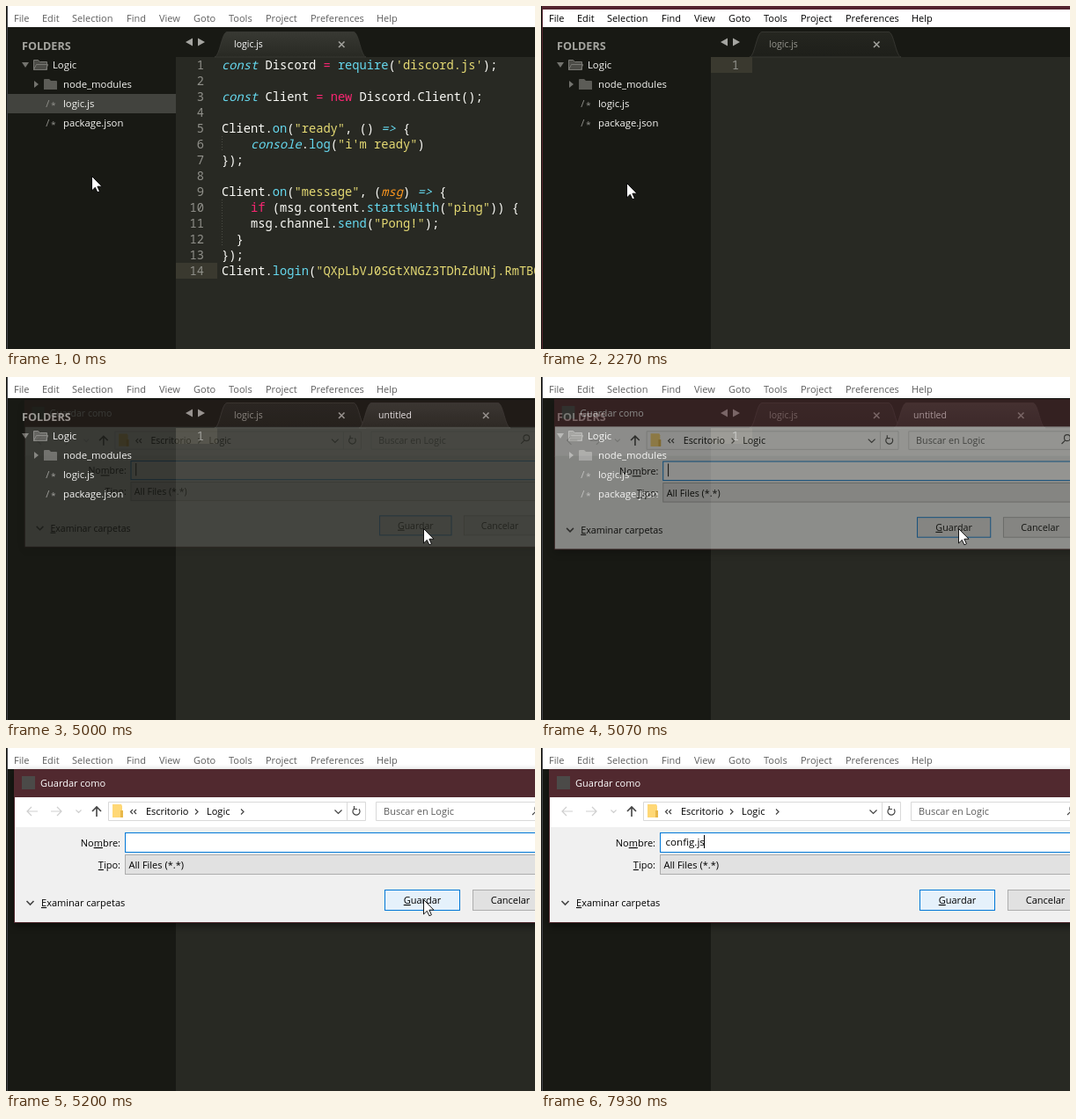
An HTML page that plays this animation: 601x390 px, repeating every 8 s.

```html
<!DOCTYPE html>
<html lang="en">
<head>
<meta charset="utf-8">
<title>Editor: save as</title>
<style>
  html, body { margin: 0; width: 100%; height: 100%; overflow: hidden; background: #181914; }
  svg { display: block; }
  text { white-space: pre; font: 11px "Open Sans", "Noto Sans", sans-serif; }
  .code text { font: 500 13.745px "Noto Sans Mono", "DejaVu Sans Mono", monospace; fill: #fcfcf8; }
  .code .num { fill: #90908a; text-anchor: end; }
  .kw { fill: #f92672; }
  .fn { fill: #66d9ef; }
  .type { fill: #66d9ef; font-style: italic; }
  .str { fill: #e6db74; }
  .arg { fill: #fd971f; font-style: italic; }
  .side text { font-size: 11.3px; fill: #f6f6f3; }
  .side .heading { font-size: 12.6px; font-weight: 700; fill: #a4a49f; }
  .side .mark { font: 11px "Noto Sans Mono", monospace; fill: #8e8e89; }
  .tab text { font-size: 10.5px; }
  .dialog text { fill: #000; }
  .dialog .title { fill: #fff; }
  .dialog .hint { fill: #5c5c5c; }
  .mid { text-anchor: middle; }
  .end { text-anchor: end; }
  .u { text-decoration: underline; }
  .line { fill: none; stroke: #444; stroke-width: 1.2; }
</style>
</head>
<body>
<svg id="stage" width="601" height="390" viewBox="0 0 601 390">
  <defs>
    <linearGradient id="tabOn" x1="0" y1="0" x2="0" y2="1">
      <stop offset="0" stop-color="#383933"/><stop offset="1" stop-color="#282923"/>
    </linearGradient>
    <linearGradient id="tabOff" x1="0" y1="0" x2="0" y2="1">
      <stop offset="0" stop-color="#252620"/><stop offset="1" stop-color="#1e1f1a"/>
    </linearGradient>
    <filter id="shadow" x="-10%" y="-10%" width="120%" height="125%">
      <feGaussianBlur stdDeviation="5"/>
    </filter>
  </defs>

  <rect width="601" height="390" fill="#181914"/>
  <rect x="193" y="58" width="408" height="332" fill="#282923"/>

  <g class="side">
    <rect id="selectedRow" x="2" y="100" width="191" height="22" fill="#42433e"/>
    <text class="heading" x="18" y="50">FOLDERS</text>
    <path d="M18 64h8l-4 6zM32 85v8l5-4z" fill="#73736e"/>
    <path d="M31.500 72.500v-11h5l2 2h8v9zM31.500 72.500l3-6h13l-2 6z" fill="#4c4c47" stroke="#777772"/>
    <path d="M43 95v-11q0-1 1-1h5l2 2h6q1 0 1 1v9z" fill="#5c5c57"/>
    <text x="53" y="71">Logic</text>
    <text x="65" y="93">node_modules</text>
    <text class="mark" x="44" y="115">/<tspan dy="2">*</tspan></text><text x="65" y="115">logic.js</text>
    <text class="mark" x="44" y="137">/<tspan dy="2">*</tspan></text><text x="65" y="137">package.json</text>
  </g>

  <path d="M212 36.500v9l-8-4.500zM218 36.500v9l8-4.500z" fill="#a5a5a1"/>
  <g id="tabs"></g>
  <g id="code" class="code"></g>
  <g id="blank" class="code">
    <rect x="193" y="58" width="47" height="18" fill="#3a392f"/>
    <text class="num" x="225" y="72">1</text>
  </g>

  <rect id="border" x="1" width="1" height="390"/>
  <rect x="2" width="599" height="24" fill="#fff"/>
  <rect id="titleStrip" x="2" width="599" height="4"/>
  <g id="menu"></g>

  <g id="dialog" class="dialog">
    <rect x="9" y="28" width="620" height="174" fill="#000" opacity=".5" filter="url(#shadow)"/>
    <rect x="9" y="24" width="620" height="175" fill="#51292f"/>
    <rect x="10" y="56" width="620" height="35" fill="#fff"/>
    <rect x="10" y="90" width="620" height="108" fill="#f0f0f0"/>
    <rect x="18" y="32" width="15" height="15" fill="#4b4a48"/>
    <text class="title" x="39" y="44">Guardar como</text>

    <path class="line" style="stroke:#cfcfcf" d="M36 72H24m5-5-5 5 5 5M51 72h12m-5-5 5 5-5 5M79.500 70.500l3 3 3-3"/>
    <path class="line" style="stroke-width:1.600" d="M103 78V67m-5 5 5-5 5 5"/>
    <path d="M116.500 61.500h292v21h-292zM387.500 61.500v21M420.500 61.500h200v21h-200z" fill="none" stroke="#d9d9d9"/>
    <path d="M121 64h10l1 2v13h-11z" fill="#ffd876"/>
    <path d="M130 71h3v8h-3z" fill="#e8b84a"/>
    <path class="line" d="M144 70l-2.500 2.500 2.500 2.500m4-5-2.500 2.500 2.500 2.500M215 69.500l3 3-3 3M373.500 70.500l4 4 4-4M401 69.500a4 4 0 1 1-5.500-.5M395.500 66v3.500h3.500M608 69a3.500 3.500 0 1 0-7 0 3.500 3.500 0 1 0 7 0M602 72l-4 4"/>
    <path id="crumb" class="line" d="M267 69.500l3 3-3 3"/>
    <text x="159" y="76">Escritorio</text>
    <text x="228" y="76">Logic</text>
    <text class="hint" x="429" y="76">Buscar en Logic</text>

    <text class="end" x="130" y="112">No<tspan class="u">m</tspan>bre:</text>
    <rect x="135.500" y="96.500" width="500" height="22" fill="#fff" stroke="#0078d7"/>
    <text id="fileName" x="141.500" y="111" style="font-size:11.600px"></text>
    <rect id="caret" y="99" width="1" height="15"/>
    <text class="end" x="130" y="137"><tspan class="u">T</tspan>ipo:</text>
    <rect x="135.500" y="121.500" width="500" height="22" fill="#e1e1e1" stroke="#adadad"/>
    <text x="139.500" y="137">All Files (*.*)</text>

    <path class="line" style="stroke-width:1.600" d="M23.500 174l4 4 4-4"/>
    <text x="40" y="180"><tspan class="u">E</tspan>xaminar carpetas</text>
    <rect id="save" x="430.500" y="161.500" width="85" height="23" stroke="#0078d7"/>
    <text class="mid" x="473" y="177"><tspan class="u">G</tspan>uardar</text>
    <rect x="530.500" y="161.500" width="85" height="23" fill="#e1e1e1" stroke="#adadad"/>
    <text class="mid" x="573" y="177">Cancelar</text>
  </g>

  <g id="spinner" fill="none" stroke="#000">
    <path d="M104 211.500A11 11 0 1 0 123.500 219" stroke-width="1.500" opacity=".75"/>
    <circle cx="123" cy="215.500" r="3.500" fill="#000" stroke="none"/>
  </g>
  <path id="pointer" d="M.5.5v16.500l3.800-3.700 2.600 5.500 2.500-1.100-2.500-5.500h5.100z" fill="#fff" stroke="#000" stroke-width=".9"/>
</svg>

<script>
const LOOP = 8000;
const $ = id => document.getElementById(id);
const show = (id, on) => $(id).setAttribute('visibility', on ? 'visible' : 'hidden');
const fill = (id, color) => $(id).setAttribute('fill', color);
const between = (t, from, to) => t >= from && t < to;
// Last entry whose time has been reached; entries are [time, ...values].
const at = (steps, t) => steps.filter(s => s[0] <= t).pop();

const menu = { File: 9, Edit: 41, Selection: 75, Find: 137, View: 174, Goto: 213,
  Tools: 253, Project: 295, Preferences: 346, Help: 421 };
$('menu').innerHTML = Object.entries(menu)
  .map(([label, x]) => `<text x="${x}" y="18">${label}</text>`).join('');

const tab = (id, x, label) => `<g id="${id}" class="tab" transform="translate(${x})">
  <path class="shape" d="M0 58C6 57 8 30 14 29.500H158C164 30 166 57 172 58z" stroke="#3b3c36" stroke-width=".8"/>
  <text x="22" y="47">${label}</text>
  <path d="M141 40.500l6.500 6.500m0-6.500-6.500 6.500" stroke="#a2a29d" stroke-width="1.600"/></g>`;
$('tabs').innerHTML = tab('tabLogic', 237, 'logic.js') + tab('tabNew', 401, 'untitled');

function styleTab(id, selected) {
  const el = $(id);
  el.querySelector('.shape').setAttribute('fill', `url(#${selected ? 'tabOn' : 'tabOff'})`);
  el.querySelector('text').setAttribute('fill', selected ? '#fff' : '#96968f');
}

const span = name => s => `<tspan class="${name}">${s}</tspan>`;
const [kw, fn, type, str, arg] = ['kw', 'fn', 'type', 'str', 'arg'].map(span);
const lines = [
  `${type('const')} Discord ${kw('=')} ${fn('require')}(${str("'discord.js'")});`,
  '',
  `${type('const')} Client ${kw('=')} ${kw('new')} Discord.Client();`,
  '',
  `Client.${fn('on')}(${str('"ready"')}, () ${type('=&gt;')} {`,
  `    ${type('console')}.${fn('log')}(${str('"i\'m ready"')})`,
  '});',
  '',
  `Client.${fn('on')}(${str('"message"')}, (${arg('msg')}) ${type('=&gt;')} {`,
  `    ${kw('if')} (msg.content.${fn('startsWith')}(${str('"ping"')})) {`,
  `    msg.channel.${fn('send')}(${str('"Pong!"')});`,
  '  }',
  '});',
  `Client.${fn('login')}(${str('"QXpLbVJ0SGtXNGZ3TDhZdUNj.RmTB0xWq')}`
];
$('code').innerHTML = '<rect x="193" y="292" width="47" height="18" fill="#3a392f"/>' +
  '<path d="M245.500 148v18M245.500 220v54" stroke="#4a4b44" stroke-dasharray="1 2"/>' +
  lines.map((line, i) => {
    const y = 72 + 18 * i;
    return `<text class="num" x="225" y="${y}">${i + 1}</text><text x="245" y="${y}">${line}</text>`;
  }).join('');

const fileName = 'config.js';
const keyTimes = [6000, 6330, 6530, 6730, 6870, 7000, 7130, 7330, 7400];
const BLINK = 265;

// time, opacity, scale
const dialogSteps = [[0, 0, 1], [4930, .02, .94], [5000, .14, .958], [5070, .5, .979],
  [5130, .82, .993], [5200, 1, 1]];
// time, x, y
const pointerSteps = [[0, 97, 193], [70, 97, 198], [130, 97, 201], [4930, 474, 172]];

function drawCaret(t) {
  const typed = keyTimes.filter(k => k <= t).length;
  const name = $('fileName');
  name.textContent = fileName.slice(0, typed);
  const width = typed ? name.getComputedTextLength() : 0;
  $('caret').setAttribute('x', Math.round(141 + width));
  const on = typed
    ? Math.floor((t - keyTimes[typed - 1]) / BLINK) % 2 === 0
    : between(t, 4930, 5200) || between(t, 5530, 5800);
  $('caret').setAttribute('opacity', on ? 1 : 0);
}

function render(t) {
  const active = between(t, 130, 4870);
  const blank = t >= 2270;
  const dialogReady = t >= 5200;
  fill('titleStrip', active ? '#55252f' : '#fff');
  fill('border', active ? '#55252f' : '#45454a');
  fill('menu', active ? '#000' : '#5e5e5e');

  show('code', !blank);
  show('blank', blank);
  show('selectedRow', !blank);
  styleTab('tabLogic', !blank);
  styleTab('tabNew', true);
  $('tabNew').setAttribute('opacity', t < 2530 ? 0 : t < 2600 ? .6 : 1);

  const [, opacity, scale] = at(dialogSteps, t);
  show('dialog', opacity > 0);
  $('dialog').setAttribute('opacity', opacity);
  $('dialog').setAttribute('transform', `translate(290 75) scale(${scale}) translate(-290 -75)`);
  show('crumb', dialogReady);
  fill('save', dialogReady ? '#e5f1fb' : '#e1e1e1');
  drawCaret(t);

  const busy = between(t, 4270, 4330) || between(t, 4730, 4930);
  const [, x, y] = at(pointerSteps, t);
  show('spinner', busy);
  show('pointer', !busy && t < 6000);
  $('pointer').setAttribute('transform', `translate(${x} ${y})`);
}

const start = performance.now();
function tick() {
  render((performance.now() - start) % LOOP);
  requestAnimationFrame(tick);
}
render(0);
requestAnimationFrame(tick);
</script>
</body>
</html>
```
